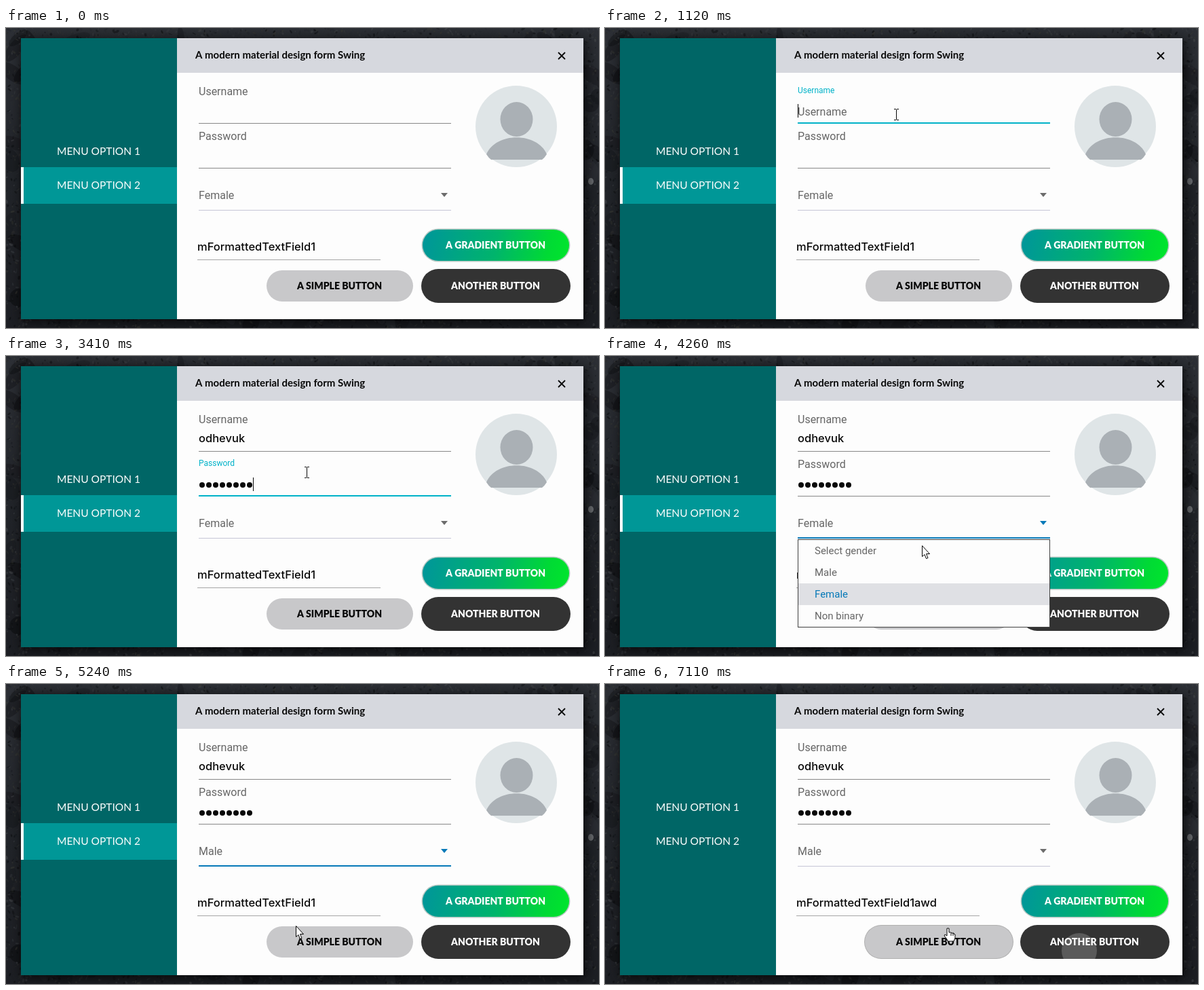
An HTML page with a canvas for the animation above (7.16 s loop, 874 by 442 pixels).

```html
<!DOCTYPE html>
<html lang="en">
<head>
<meta charset="utf-8">
<title>Material form</title>
<style>
html, body { margin: 0; width: 874px; height: 442px; overflow: hidden; background: #181a1f; }
canvas { display: block; }
</style>
</head>
<body>
<canvas id="stage" width="874" height="442"></canvas>
<script>
const W = 874, H = 442, LOOP = 7160;
const ctx = document.getElementById('stage').getContext('2d');

const LATO = 'Lato, sans-serif', ROBOTO = 'Roboto, sans-serif', INTER = 'Inter, sans-serif';
const PAPER = '#fdfdfd', INK = '#080808', MUTED = '#666666', LINE = '#888888';
const TEAL = '#00b2c8', BLUE = '#0679b8';

// When things happen, in ms
const T = {
  name: 900, nameType: 1250, pass: 2220, passType: 2600, combo: 3700, open: 3720,
  pick: 4700, field: 5600, fieldType: 5780, blur: 6740, press: 6780, menuOff: 6780
};
const USER = 'odhevuk', EXTRA = 'awd';

// Pointer stops: time, x, y
const PATH = [
  [500, 429, -24], [850, 429, 127], [3250, 429, 127], [3650, 467, 252], [3900, 467, 254],
  [4150, 467, 280], [4340, 467, 280], [4620, 440, 320], [4800, 440, 320], [5120, 427, 357],
  [5280, 427, 357], [5560, 515, 332], [6350, 515, 332], [6720, 699, 393],
  [6810, 699, 393], [7080, 505, 360]
];

const clamp = v => Math.max(0, Math.min(1, v));
const ease = v => { v = clamp(v); return v * v * (3 - 2 * v); };
const mix = (a, b, v) => a + (b - a) * v;

// Rises after the start and falls after the end
const focus = (t, a, b) => ease((t - a) / 180) * (1 - ease((t - b) / 180));
const typed = (t, start, step, n) => Math.max(0, Math.min(n, Math.floor((t - start) / step) + 1));

function rect(x, y, w, h, fill, c = ctx) {
  c.fillStyle = fill;
  c.fillRect(x, y, w, h);
}

function text(s, x, y, font, fill, align = 'left') {
  ctx.font = font;
  ctx.fillStyle = fill;
  ctx.textAlign = align;
  ctx.fillText(s, x, y);
}

function pill(x, y, w, h, fill) {
  ctx.beginPath();
  ctx.roundRect(x, y, w, h, h / 2);
  ctx.fillStyle = fill;
  ctx.fill();
}

function disc(x, y, r, fill) {
  ctx.beginPath();
  ctx.arc(x, y, r, 0, 7);
  ctx.fillStyle = fill;
  ctx.fill();
}

function poly(points, fill, stroke) {
  ctx.beginPath();
  points.forEach(p => ctx.lineTo(p[0], p[1]));
  ctx.closePath();
  ctx.fillStyle = fill;
  ctx.fill();
  if (stroke) {
    ctx.strokeStyle = stroke;
    ctx.lineWidth = 1;
    ctx.stroke();
  }
}

function makeBackdrop() {
  const cv = document.createElement('canvas');
  cv.width = W;
  cv.height = H;
  const c = cv.getContext('2d');
  let seed = 11;
  const rnd = () => (seed = (seed * 16807) % 2147483647) / 2147483647;
  const g = c.createLinearGradient(0, 0, 0, H);
  g.addColorStop(0, '#2c2f35');
  g.addColorStop(.5, '#212429');
  g.addColorStop(1, '#1c1e23');
  rect(0, 0, W, H, g, c);

  function blobs(n, size, tones) {
    for (let i = 0; i < n; i++) {
      c.globalAlpha = .2 + rnd() * .35;
      c.fillStyle = tones[Math.floor(rnd() * tones.length)];
      c.beginPath();
      c.ellipse(rnd() * W, rnd() * H, size * (.3 + rnd()), size * (.2 + rnd() * .5), rnd() * 3, 0, 7);
      c.fill();
    }
  }
  blobs(260, 20, ['#08090b', '#2f3238', '#14161a']);
  blobs(9000, 2.6, ['#08090b', '#43464a', '#23262c', '#3a3b35']);
  c.globalAlpha = .7;
  c.fillStyle = '#85878a';
  c.beginPath();
  c.ellipse(862, 226, 4, 5, 0, 0, 7);
  c.fill();
  c.globalAlpha = 1;
  c.shadowColor = 'rgba(0,0,0,.85)';
  c.shadowBlur = 18;
  c.shadowOffsetX = 3;
  c.shadowOffsetY = 3;
  rect(22, 15, 829, 414, '#000', c);
  return cv;
}
const backdrop = makeBackdrop();

function drawFrame(t) {
  ctx.drawImage(backdrop, 0, 0);
  rect(252, 15, 599, 414, PAPER);
  rect(252, 15, 599, 51, '#d6d8de');
  text('A modern material design form Swing', 279, 45, 'bold 15px ' + LATO, INK);
  ctx.strokeStyle = INK;
  ctx.lineWidth = 1.8;
  ctx.beginPath();
  for (const d of [-5, 5]) {
    ctx.moveTo(819 - d, 36);
    ctx.lineTo(819 + d, 46);
  }
  ctx.stroke();

  rect(22, 15, 230, 414, '#006666');
  if (t < T.menuOff) {
    rect(22, 205, 230, 54, '#009797');
    rect(22, 205, 4, 54, PAPER);
  }
  text('MENU OPTION 1', 136.5, 187, '15.5px ' + LATO, PAPER, 'center');
  text('MENU OPTION 2', 136.5, 237, '15.5px ' + LATO, PAPER, 'center');
}

function drawAvatar() {
  disc(752, 145, 60, '#dfe5e7');
  ctx.fillStyle = '#aab0b5';
  ctx.beginPath();
  ctx.ellipse(752.5, 134.5, 24, 25.5, 0, 0, 7);
  ctx.fill();
  ctx.beginPath();
  ctx.moveTo(708, 186);
  ctx.bezierCurveTo(722, 153, 783, 153, 797, 186);
  ctx.quadraticCurveTo(794, 191, 790, 194);
  ctx.lineTo(715, 194);
  ctx.quadraticCurveTo(711, 191, 708, 186);
  ctx.fill();
}

// Underline whose coloured part spreads out from the middle
function underline(x, y, w, f, base, accent) {
  rect(x, y, w, 1, base);
  if (f > 0) rect(x + w * (1 - f) / 2, y - 1, w * f, 2, accent);
}

function caret(x, y, t, start, end) {
  if (t >= start && t < end) rect(x, y, 1, 20, INK);
}

function drawField(label, y, f, empty) {
  const size = mix(16, 12, f);
  text(label, 284, y - mix(41, 44, f), size + 'px ' + ROBOTO, f > .5 ? TEAL : MUTED);
  if (empty && f > 0) {
    ctx.globalAlpha = f;
    text(label, 284, y - 11, '16px ' + ROBOTO, MUTED);
    ctx.globalAlpha = 1;
  }
  underline(284, y, 372, f, LINE, TEAL);
}

function drawFields(t) {
  const entry = '500 16.5px ' + INTER;
  const word = USER.slice(0, typed(t, T.nameType, 110, USER.length));
  drawField('Username', 140, focus(t, T.name, T.pass), !word);
  text(word, 284, 127, entry, INK);
  caret(284 + ctx.measureText(word).width, 112, t, T.name, T.pass);

  const dots = typed(t, T.passType, 95, 8);
  drawField('Password', 206, focus(t, T.pass, T.combo), !dots);
  for (let i = 0; i < dots; i++) disc(289 + i * 10, 190, 4, INK);
  caret(284 + dots * 10, 179, t, T.pass, T.combo);

  const f = focus(t, T.combo, T.field);
  text(t < T.pick ? 'Female' : 'Male', 284, 252, '16px ' + ROBOTO, MUTED);
  poly([[641, 243], [651, 243], [646, 249]], f > .5 ? BLUE : '#6c6c6c');
  underline(284, 268, 372, f, '#c6c6d6', BLUE);

  const line = 'mFormattedTextField1' + EXTRA.slice(0, typed(t, T.fieldType, 120, EXTRA.length));
  text(line, 282, 328, entry, INK);
  caret(282 + ctx.measureText(line).width, 314, t, T.field, T.blur);
  underline(282, 341, 270, focus(t, T.field, T.blur), '#a6a6a6', TEAL);
}

function drawButtons(t, p) {
  const bold = '900 14px ' + LATO;
  pill(612.5, 295.5, 219, 49, '#b9c9c4');
  const g = ctx.createLinearGradient(614, 300, 830, 340);
  g.addColorStop(0, '#00969a');
  g.addColorStop(.5, '#00b46c');
  g.addColorStop(.85, '#00da34');
  g.addColorStop(1, '#00e62c');
  pill(614, 297, 216, 46, g);
  text('A GRADIENT BUTTON', 721.5, 325, bold, PAPER, 'center');

  if (p && over(p, 384, 358, 600, 403)) {
    pill(382, 355, 220, 50, '#b0b0b0');
    pill(383, 356, 218, 48, '#c8c8ca');
  } else {
    pill(384, 357, 216, 46, '#c8c8ca');
  }
  text('A SIMPLE BUTTON', 491.5, 385, bold, INK, 'center');

  pill(612, 355, 220, 50, '#333333');
  if (t > T.press) {
    ctx.save();
    ctx.beginPath();
    ctx.roundRect(612, 355, 220, 50, 25);
    ctx.clip();
    disc(699, 393, 26 * clamp((t - T.press) / 330), '#5a5a5a');
    ctx.restore();
  }
  text('ANOTHER BUTTON', 721.5, 385, bold, PAPER, 'center');
}

function drawPopup(t, p) {
  if (t < T.open || t >= T.pick + 40) return;
  rect(284, 270, 372, 130, '#404040');
  rect(285, 271, 370, 128, PAPER);
  const hot = t < 4400 ? 2 : Math.floor((p.y - 271) / 32);
  ['Select gender', 'Male', 'Female', 'Non binary'].forEach((s, i) => {
    if (i === hot) rect(285, 271 + i * 32, 370, 32, '#dfe0e4');
    text(s, 309, 292 + i * 32, '15px ' + ROBOTO, i === 2 ? BLUE : MUTED);
  });
}

function pointer(t) {
  if (t < PATH[0][0]) return null;
  let i = 0;
  while (i < PATH.length - 2 && t > PATH[i + 1][0]) i++;
  const a = PATH[i], b = PATH[i + 1], v = ease((t - a[0]) / (b[0] - a[0]));
  return { x: mix(a[1], b[1], v), y: mix(a[2], b[2], v) };
}

function over(p, x0, y0, x1, y1) {
  return p.x >= x0 && p.x <= x1 && p.y > y0 && p.y <= y1;
}

function drawPointer(p, t) {
  if (!p) return;
  const popup = t >= T.open && t < T.pick + 40;
  ctx.save();
  ctx.translate(Math.round(p.x), Math.round(p.y));
  if (over(p, 284, 104, 656, 207) || (!popup && over(p, 282, 306, 552, 342))) {
    rect(0, -7, 1, 15, INK);
    for (const y of [-8, 8]) {
      rect(-3, y, 3, 1, INK);
      rect(1, y, 3, 1, INK);
    }
  } else if (over(p, 384, 358, 600, 403) || over(p, 612, 296, 832, 405)) {
    poly([[-1, 0], [2, 0], [2, 6], [5, 6], [6, 7], [9, 7], [10, 9], [11, 9], [11, 14],
      [9, 19], [0, 19], [-1, 16], [-5, 11], [-4, 9], [-1, 11]], '#fff', INK);
    for (const x of [4.5, 7.5]) rect(x, 7, 1, 4, INK);
  } else {
    poly([[.5, -.5], [.5, 15.5], [4, 12.5], [6.5, 18.5], [9, 17.5], [6.5, 11.5], [11.5, 11.5]],
      '#fff', INK);
  }
  ctx.restore();
}

function draw(t) {
  const p = pointer(t);
  drawFrame(t);
  drawAvatar();
  drawFields(t);
  drawButtons(t, p);
  drawPopup(t, p);
  drawPointer(p, t);
}

const start = performance.now();
function tick(now) {
  draw(Math.max(0, now - start) % LOOP);
  requestAnimationFrame(tick);
}
draw(0);
requestAnimationFrame(tick);
</script>
</body>
</html>
```
